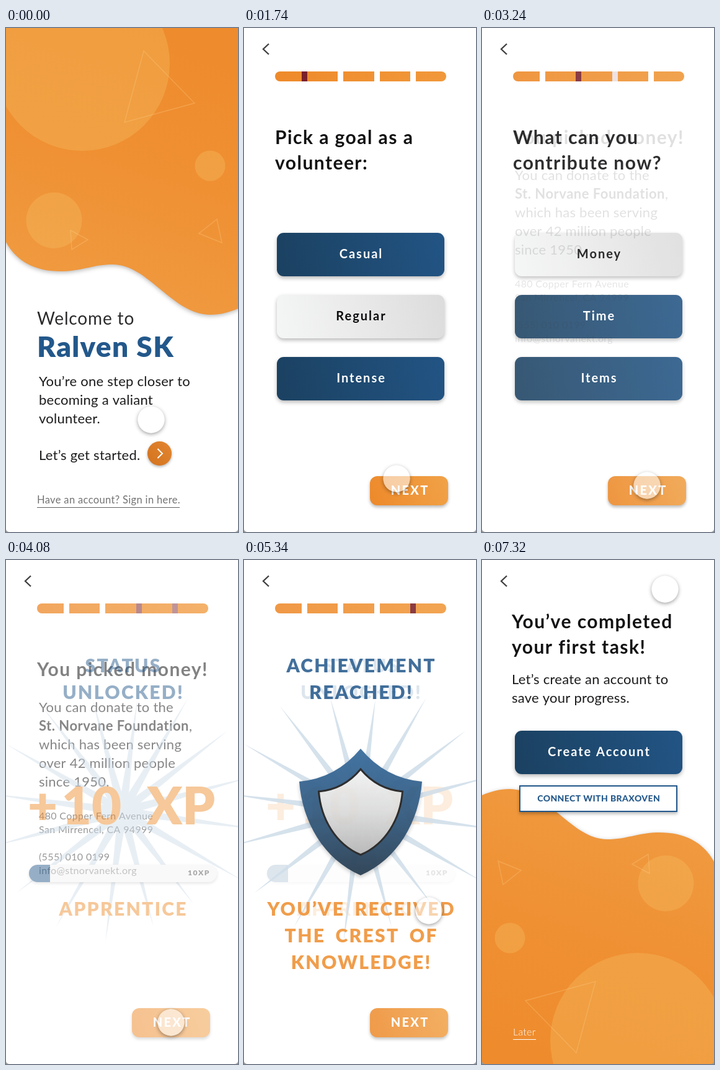
These frames come from a looping animation (374 px wide and 812 px high, 7380 ms). An HTML page with a canvas:

```html
<!DOCTYPE html>
<html lang="en">
<head>
<meta charset="utf-8">
<title>Volunteer onboarding</title>
<style>
  html, body { margin: 0; width: 100%; height: 100%; overflow: hidden; background: #fff; }
  canvas { display: block; }
</style>
</head>
<body>
<canvas id="stage" width="374" height="812"></canvas>
<script>
const W = 374, H = 812, LOOP = 7380, FADE = 420;
const NAVY = '#23588b', ORANGE = '#ee8c2c', INK = '#1b1b1d', MAROON = '#7a2029';
const stage = document.getElementById('stage').getContext('2d');
let c = stage;

function gradient(x0, y0, x1, y1, ...stops) {
  const g = c.createLinearGradient(x0, y0, x1, y1);
  stops.forEach((s, i) => g.addColorStop(i / (stops.length - 1), s));
  return g;
}

function withShadow(dy, blur, alpha, draw) {
  c.save();
  c.shadowColor = `rgba(0,0,0,${alpha})`;
  c.shadowOffsetY = dy;
  c.shadowBlur = blur;
  draw();
  c.restore();
}

function box(x, y, w, h, r, fill) {
  c.fillStyle = fill;
  c.beginPath();
  c.roundRect(x, y, w, h, r);
  c.fill();
}

function disc(x, y, r, fill) {
  c.fillStyle = fill;
  c.beginPath();
  c.arc(x, y, r, 0, Math.PI * 2);
  c.fill();
}

function line(points, color, width, closed) {
  c.strokeStyle = color;
  c.lineWidth = width;
  c.beginPath();
  points.forEach(([x, y]) => c.lineTo(x, y));
  if (closed) c.closePath();
  c.stroke();
}

function text(str, x, y, size, { weight = 400, color = INK, gap = 0, word = 0, align = 'left' } = {}) {
  c.font = `${weight} ${size}px Lato, "Open Sans", sans-serif`;
  c.letterSpacing = gap + 'px';
  c.wordSpacing = word + 'px';
  c.textAlign = align;
  c.fillStyle = color;
  c.fillText(str, x + (align === 'center' ? gap / 2 : 0), y);
}

const title = (str, x, y) => text(str, x, y, 30, { weight: 700, color: '#121214', gap: 1.45 });
const body = (lines, x, y) => lines.forEach((s, i) => text(s, x, y + i * 30, 22, { gap: 0.25 }));
const small = (str, y) => text(str, 53, y, 16, { gap: 0.35, color: '#3c3c3e' });
const display = (str, y, color) =>
  text(str, 188, y, 30, { weight: 900, color, gap: 2.3, word: 7, align: 'center' });

function button(label, y, picked) {
  const fill = picked
    ? gradient(53, y + 60, 323, y, '#f4f6f5', '#e9e9e9', '#dcdcdc')
    : gradient(53, y + 60, 323, y, '#1b4161', '#225484');
  withShadow(3, 6, 0.28, () => box(53, y, 270, 70, 11, fill));
  text(label, 188, y + 41, 20, {
    weight: 700, color: picked ? '#0c0c0e' : '#fff', gap: 2, align: 'center'
  });
}

function nextButton() {
  withShadow(3, 5, 0.28, () =>
    box(203, 722, 126, 47, 12, gradient(203, 769, 329, 722, '#ed892a', '#f1a248')));
  text('NEXT', 266.5, 752, 20, { weight: 800, color: '#fff', gap: 2.3, align: 'center' });
}

function progress(step) {
  const fill = gradient(50, 0, 326, 0, '#ee8a2b', '#f1983a');
  const gaps = [93, 151, 210, 268];
  [50, ...gaps.map(x => x + 9)].forEach((x, i) => {
    const end = gaps[i] || 326;
    const r = i === 0 ? [8, 0, 0, 8] : end === 326 ? [0, 8, 8, 0] : 0;
    box(x, 70, end - x, 16, r, fill);
  });
  box(gaps[step], 70, 9, 16, 0, MAROON);
}

function wave() {
  withShadow(2, 7, 0.28, () => {
    c.fillStyle = gradient(270, 0, 120, 430, '#ee8b2c', '#ef9033', '#f09a40');
    c.beginPath();
    c.moveTo(-20, -20);
    c.lineTo(-20, 300);
    c.lineTo(0, 345);
    c.bezierCurveTo(18, 378, 50, 393, 92, 392);
    c.bezierCurveTo(125, 391, 140, 381, 172, 381);
    c.bezierCurveTo(230, 381, 268, 462, 330, 462);
    c.bezierCurveTo(345, 462, 360, 458, 374, 452);
    c.lineTo(394, 440);
    c.lineTo(394, -20);
    c.fill();
  });
  const glow = 'rgba(244,188,98,.36)';
  disc(123, 57, 141, glow);
  disc(329, 222, 24.5, glow);
  disc(77.5, 310, 45, glow);
  const edge = 'rgba(255,214,150,.26)';
  line([[222, 37], [304, 121], [191, 152]], edge, 1.5, true);
  line([[104, 326], [132, 341], [106, 357]], edge, 1.5, true);
  line([[340, 308], [348, 346], [311, 331]], edge, 1.5, true);
}

function rays() {
  const reach = [222, 222, 188, 193, 212, 215, 216, 222, 222, 217, 213, 190, 182, 210, 213, 222];
  c.fillStyle = '#d0deea';
  reach.forEach((len, i) => {
    c.save();
    c.translate(188, 405);
    c.rotate((7.5 + i * 22.5) * Math.PI / 180);
    c.beginPath();
    c.moveTo(0, -7.5);
    c.lineTo(len, 0);
    c.lineTo(0, 7.5);
    c.fill();
    c.restore();
  });
}

function crest(top, shoulder, foot, half) {
  const mid = 188, drop = foot - shoulder, dip = shoulder - (shoulder - top) * 0.1;
  c.beginPath();
  c.moveTo(mid, top);
  c.quadraticCurveTo(mid + half * 0.4, dip, mid + half, shoulder);
  c.bezierCurveTo(mid + half * 0.95, shoulder + drop * 0.43, mid + half * 0.6, foot - drop * 0.17, mid, foot);
  c.bezierCurveTo(mid - half * 0.6, foot - drop * 0.17, mid - half * 0.95, shoulder + drop * 0.43, mid - half, shoulder);
  c.quadraticCurveTo(mid - half * 0.4, dip, mid, top);
  c.closePath();
}

function welcome() {
  wave();
  text('Welcome to', 50, 478, 28, { gap: 0.85, color: '#2b2b2d' });
  text('Ralven SK', 50, 530, 46, { weight: 900, color: NAVY, gap: 1.3 });
  body(['You’re one step closer to', 'becoming a valiant', 'volunteer.'], 53, 577);
  body(['Let’s get started.'], 53, 696);
  withShadow(2, 4, 0.3, () => disc(247.5, 685.5, 19.5, gradient(230, 700, 265, 670, '#d4741f', '#e28530')));
  line([[244.5, 678], [252, 685.5], [244.5, 693]], '#fff', 2);
  text('Have an account? Sign in here.', 50, 766, 16.5, { gap: 0.35, color: '#737375' });
  box(50, 772, 230, 1, 0, '#626264');
}

function choice(step, lines, labels, picked) {
  progress(step);
  lines.forEach((s, i) => title(s, 50, 187 + i * 41));
  labels.forEach((s, i) => button(s, 330 + i * 100, i === picked));
  nextButton();
}

const goal = picked => () =>
  choice(0, ['Pick a goal as a', 'volunteer:'], ['Casual', 'Regular', 'Intense'], picked);
const give = picked => () =>
  choice(1, ['What can you', 'contribute now?'], ['Money', 'Time', 'Items'], picked);

function money() {
  progress(2);
  title('You picked money!', 50, 187);
  body(['You can donate to the'], 53, 245);
  const name = 'St. Norvane Foundation';
  text(name, 53, 275, 22, { weight: 700, gap: 0.5 });
  const end = 53 + c.measureText(name).width;
  text(',', end, 275, 22);
  body(['which has been serving', 'over 42 million people', 'since 1950.'], 53, 305);
  small('480 Copper Fern Avenue', 418);
  small('San Mirrencel, CA 94999', 440);
  small('(555) 010 0199', 484);
  small('info@stnorvanekt.org', 506);
  nextButton();
}

function status() {
  progress(3);
  rays();
  display('STATUS', 181, NAVY);
  display('UNLOCKED!', 224, NAVY);
  [['+', 59], ['10', 138], ['XP', 282]].forEach(([s, x]) =>
    text(s, x, 426, 83, { weight: 900, color: ORANGE, align: 'center' }));
  withShadow(2, 5, 0.22, () => box(37, 491, 303, 28, 14, '#f3f3f3'));
  box(37, 491, 34, 28, [14, 0, 0, 14], NAVY);
  text('10XP', 293, 508, 12, { weight: 900, color: '#4a4a4c', gap: 1.5 });
  display('APPRENTICE', 573, ORANGE);
}

function achievement() {
  progress(3);
  rays();
  display('ACHIEVEMENT', 181, NAVY);
  display('REACHED!', 224, NAVY);
  withShadow(3, 6, 0.25, () => {
    crest(304, 357, 508, 99);
    c.fillStyle = gradient(0, 304, 0, 508, '#235c92', '#1d4a74', '#11283d');
    c.fill();
  });
  crest(337, 373, 475, 67.5);
  c.fillStyle = gradient(0, 337, 0, 475, '#f1f1f1', '#d8d8d8', '#adadad');
  c.fill();
  c.strokeStyle = '#0b0b0c';
  c.lineWidth = 3;
  c.stroke();
  ['YOU’VE RECEIVED', 'THE CREST OF', 'KNOWLEDGE!'].forEach((s, i) => display(s, 573 + i * 43, ORANGE));
  nextButton();
}

function done() {
  c.save();
  c.translate(W, 831);
  c.rotate(Math.PI);
  wave();
  c.restore();
  title('You’ve completed', 48, 110);
  title('your first task!', 48, 151);
  body(['Let’s create an account to', 'save your progress.'], 48, 200);
  button('Create Account', 275, false);
  withShadow(3, 5, 0.28, () => box(60, 363, 255, 43, 0, NAVY));
  box(62, 365, 251, 39, 0, '#fff');
  text('CONNECT WITH BRAXOVEN', 188, 389, 14, { weight: 800, color: NAVY, gap: 0.4, align: 'center' });
  text('Later', 50, 766, 16, { weight: 300, color: '#fff', gap: 0.3 });
  box(50, 772, 37, 1, 0, '#fff');
}

// grey device edge in the two lower corners
function corners() {
  c.fillStyle = '#9b9b9b';
  c.beginPath();
  c.rect(0, H - 40, W, 40);
  c.roundRect(0, H - 40, W, 40, [0, 0, 5, 5]);
  c.fill('evenodd');
}

function render(draw) {
  const canvas = document.createElement('canvas');
  canvas.width = W;
  canvas.height = H;
  c = canvas.getContext('2d');
  draw();
  c = stage;
  return canvas;
}

const scenes = [
  [-FADE, welcome],
  [430, goal(-1)],
  [1130, goal(1)],
  [1990, give(-1)],
  [2640, give(0)],
  [3214, money],
  [3966, status],
  [5084, achievement],
  [6680, done]
].map(([start, draw]) => ({ start, image: render(draw) }));

// time, x, y of the pointer
const path = [
  [0, 234, 631], [300, 247, 686], [600, 247, 686],
  [1080, 205, 470], [1260, 205, 470],
  [1740, 246, 726], [1860, 264, 744], [2130, 264, 744],
  [2560, 210, 374], [2720, 210, 374],
  [3240, 266, 737], [3360, 266, 745], [4180, 266, 745],
  [4760, 298, 565], [5460, 298, 565],
  [6060, 285, 749], [7060, 285, 749], [7320, 295, 47]
];

function pointerAt(t) {
  const i = path.findIndex(p => p[0] > t);
  if (i < 0) return path[path.length - 1].slice(1);
  const [t0, x0, y0] = path[i - 1], [t1, x1, y1] = path[i];
  const u = (t - t0) / (t1 - t0), k = u * u * (3 - 2 * u);
  return [x0 + (x1 - x0) * k, y0 + (y1 - y0) * k];
}

function pointer(x, y) {
  c.save();
  c.beginPath();
  c.rect(0, 0, W, H);
  c.arc(x, y, 21.5, 0, Math.PI * 2);
  c.clip('evenodd');
  withShadow(2, 6, 0.38, () => disc(x, y, 21.5, '#fff'));
  c.restore();
  disc(x, y, 21.5, 'rgba(255,255,255,.56)');
}

// share of a scene that is visible, easing out
function shown(scene, t) {
  const u = Math.min(1, Math.max(0, (t - scene.start) / FADE));
  return 1 - (1 - u) ** 2;
}

function frame(now) {
  const t = now % LOOP;
  c.fillStyle = '#fff';
  c.fillRect(0, 0, W, H);
  scenes.forEach((scene, i) => {
    const next = scenes[i + 1];
    c.globalAlpha = shown(scene, t) * (next ? 1 - shown(next, t) : 1);
    if (c.globalAlpha > 0) c.drawImage(scene.image, 0, 0);
  });
  c.globalAlpha = shown(scenes[1], t);
  line([[40, 25.5], [31, 34], [40, 42.5]], '#3f3f41', 2.3);
  c.globalAlpha = 1;
  corners();
  pointer(...pointerAt(t));
}

const begin = performance.now();
function tick() {
  frame(performance.now() - begin);
  requestAnimationFrame(tick);
}
tick();
</script>
</body>
</html>
```
